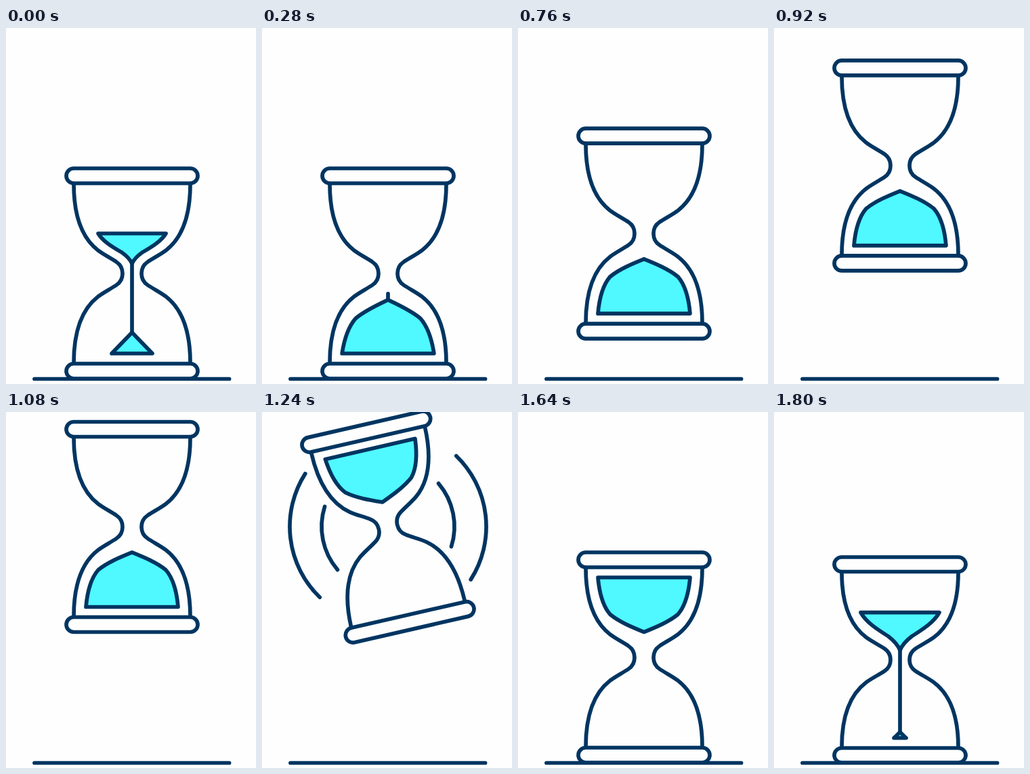
Recreate the animation shown at these times as an HTML page. Size 369 by 525 pixels, loop 1840 ms.

```html
<!DOCTYPE html>
<html lang="en">
<head>
<meta charset="utf-8">
<title>Hourglass</title>
<style>
  html, body { margin: 0; width: 100%; height: 100%; overflow: hidden; background: #fefefe; }
  svg { display: block; width: 100%; height: 100%; }
  svg * { fill: none; stroke: #003561; stroke-width: 5.7; stroke-linecap: round; stroke-linejoin: round; }
  .bar { fill: #fefefe; }
  .sand { fill: #50f8ff; }
</style>
</head>
<body>
<svg viewBox="0 0 369 525">
  <path d="M42 517.5H329.5"/>
  <g id="arcs" transform="translate(186 169)">
    <path/><path/><path/><path/>
  </g>
  <!-- Glass coordinates are centred on the neck -->
  <g id="glass">
    <path id="stream"/>
    <path id="upper" class="sand"/>
    <path id="pile" class="sand"/>
    <path id="left" d="M-86-132C-86-90-76-54-50-34C-42-28-32-23-23-17C-11-9-11 9-23 17C-32 23-42 28-50 34C-76 54-86 90-86 132"/>
    <path id="right" transform="scale(-1 1)"/>
    <rect class="bar" x="-97" y="-155" width="194" height="22" rx="11"/>
    <rect class="bar" x="-97" y="133" width="194" height="22" rx="11"/>
  </g>
</svg>
<script>
  const LOOP = 1840, STEP = 40, FLOOR = 155;
  const $ = id => document.getElementById(id);
  $('right').setAttribute('d', $('left').getAttribute('d'));

  const clamp = v => Math.min(1, Math.max(0, v));
  const span = (t, a, b) => clamp((t - a) / (b - a));
  const mix = (a, b, p) => Array.isArray(a) ? a.map((v, i) => mix(v, b[i], p)) : a + (b - a) * p;
  const easeIn = p => p * p;
  const easeOut = p => 1 - (1 - p) ** 2;
  const easeBoth = p => p < .5 ? (2 * p) ** 2.12 / 2 : 1 - (2 - 2 * p) ** 2.12 / 2;

  // Linear track through [time, value] keys
  function track(keys, t) {
    if (t <= keys[0][0]) return keys[0][1];
    for (let i = 1; i < keys.length; i++) {
      const [a, from] = keys[i - 1], [b, to] = keys[i];
      if (t <= b) return mix(from, to, span(t, a, b));
    }
    return keys[keys.length - 1][1];
  }

  // Left outline of a sand body: base corner, two curves, apex
  const full = [[-68, 118], [-66, 95], [-60, 75], [-50, 63.5], [-36, 52], [-16, 44], [0, 37.5]];
  const flip = pts => pts.map(([x, y]) => [x, -y]);
  const cone = (w, h) => [0, .17, .33, .5, .67, .83, 1].map(p => [-w * (1 - p), 118 - h * p]);
  const funnel = (w, h) => [[1, 1], [.86, .73], [.54, .53], [.3, .37], [.15, .25], [.04, .1], [0, 0]]
    .map(([x, y]) => [-w * x, -14.5 - h * y]);

  function outline(left) {
    const right = left.map(([x, y]) => [-x, y]).reverse();
    return `M${left[0]}C${left.slice(1)}C${right.slice(1)}Z`;
  }

  const upperKeys = [[1690, flip(full)], [1800, funnel(58, 57)], [1840, funnel(50, 44.5)],
    [1960, funnel(28, 22)], [2040, funnel(4, 3)]];
  const pileKeys = [[1765, cone(1, 1)], [1800, cone(9, 9)], [1840, cone(30, 31)],
    [1920, mix(cone(54, 50), full, .3)], [2040, mix(cone(67, 70), full, .72)], [2200, full]];
  const squashKeys = [[560, 0], [600, 10], [640, 12], [696, 0], [1640, 0],
    [1680, 9], [1720, 12], [1760, 10], [1800, 7], [1840, 0]];

  function arc(r, from, to) {
    const at = deg => {
      const a = deg * Math.PI / 180;
      return [r * Math.cos(a), r * Math.sin(a)];
    };
    return `M${at(from)}A${r} ${r} 0 0 1 ${at(to)}`;
  }

  function drawArcs(t) {
    const shown = t > 1120 && t < 1360;
    $('arcs').style.display = shown ? '' : 'none';
    if (!shown) return;
    const tail = easeIn(span(t, 1240, 1360));
    const heads = [track([[1120, -46], [1240, 32.6], [1280, 46]], t),
                   track([[1140, -40.5], [1240, 17.5], [1290, 40.5]], t)];
    [...$('arcs').children].forEach((path, i) => {
      const inner = i >> 1, turn = i % 2 * 180, edge = inner ? 40.5 : 46;
      const from = mix(-edge, edge, tail);
      path.setAttribute('d', arc(inner ? 98 : 145, from + turn, Math.max(from, heads[inner]) + turn));
    });
  }

  function drawSand(t) {
    const u = t < 600 ? t + LOOP : t;
    const flowing = u > 1700 && u < 2130;
    const hasUpper = u >= 1280 && u < 2040;
    const hasPile = u < 1280 || u > 1765;
    $('upper').style.display = hasUpper ? '' : 'none';
    $('pile').style.display = hasPile ? '' : 'none';
    $('stream').style.display = flowing ? '' : 'none';
    const upper = track(upperKeys, u);
    const pile = u < 1280 ? full : track(pileKeys, u);
    $('upper').setAttribute('d', outline(upper));
    $('pile').setAttribute('d', outline(pile));
    const top = u < 2040 ? upper[6][1] : mix(-14, pile[6][1], easeIn(span(u, 2020, 2130)));
    const end = mix(top, pile[6][1], easeIn(span(u, 1700, 1775)));
    $('stream').setAttribute('d', `M0 ${top}V${end}`);
  }

  function draw(t) {
    const lift = 192.5 * (easeOut(span(t, 696, 1080)) - easeIn(span(t, 1260, 1640)));
    const turn = t < 1280 ? 180 * easeBoth(span(t, 1080, 1280)) : 0;
    const squash = 1 - track(squashKeys, t) / 310;
    $('glass').setAttribute('transform',
      `translate(186 ${362 - lift}) rotate(${turn}) translate(0 ${FLOOR}) scale(1 ${squash}) translate(0 ${-FLOOR})`);
    drawSand(t);
    drawArcs(t);
  }

  let start;
  function tick(now) {
    start ??= now;
    draw(Math.floor((now - start) % LOOP / STEP) * STEP);
    requestAnimationFrame(tick);
  }
  draw(0);
  requestAnimationFrame(tick);
</script>
</body>
</html>
```
